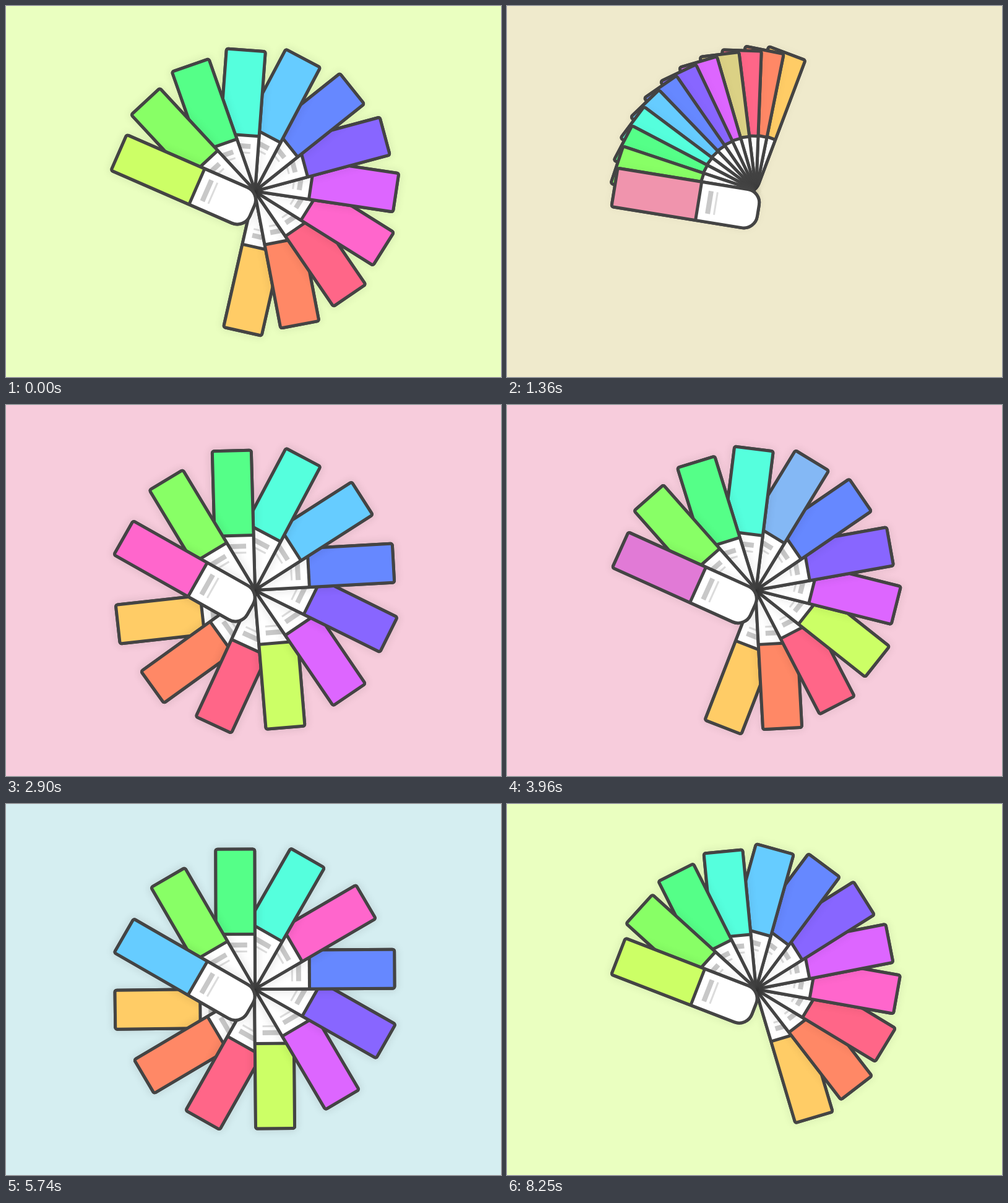
Write an HTML page with a canvas that moves like this. It is 800x600 px and loops after 8280 ms.

```html
<!DOCTYPE html>
<html lang="en">
<head>
<meta charset="utf-8">
<title>Colour swatch fan</title>
<style>
  html, body { margin: 0; width: 100%; height: 100%; overflow: hidden; }
  canvas { display: block; }
</style>
</head>
<body>
<canvas id="stage" width="800" height="600"></canvas>
<script>
const ctx = document.getElementById('stage').getContext('2d');
const LOOP = 8280, FIRST_TAP = 940;
const MOVE = 700, DELAY = 16;
const PIVOT = [402, 299], OPEN = 30, CLOSED = 0.34;
const INK = '#444';

const hex = s => [1, 3, 5].map(i => parseInt(s.slice(i, i + 2), 16));
const SWATCHES = ['#ccff66', '#88ff66', '#55ff88', '#55ffdd', '#66ccff', '#6688ff',
  '#8866ff', '#dd66ff', '#ff66cc', '#ff6688', '#ff8866', '#ffcc66'].map(hex);
const [LIME, PINK, BLUE, MINT] = ['#eaffc0', '#f7ccdc', '#d5eef1', '#dcffee'].map(hex);

// Each round: a tap picks a card and closes the fan, a second tap opens it.
const ROUNDS = [
  { close: 0, open: 1360, pick: 8, at: [427, 465], back: [LIME, PINK] },
  { close: 2750, open: 4140, pick: 4, at: [532, 195], back: [PINK, BLUE] },
  { close: 5530, open: 6890, pick: 8, at: [427, 465], back: [BLUE, MINT, LIME] },
];
const TOP_TAP = [247, 326];

const clamp = x => Math.min(1, Math.max(0, x));
const ease = x => x < 0.5 ? 4 * x ** 3 : 1 - 4 * (1 - x) ** 3;
const mix = (a, b, p) => a.map((v, i) => v + (b[i] - v) * p);
const css = c => `rgb(${c.map(Math.round)})`;

function mixPath(stops, p) {
  const x = p * (stops.length - 1);
  const i = Math.min(Math.floor(x), stops.length - 2);
  return mix(stops[i], stops[i + 1], x - i);
}

function swap(colors, pick, p) {
  const top = colors[0], other = colors[pick];
  colors[0] = mix(top, other, p);
  colors[pick] = mix(other, top, p);
}

function box(color, ...rect) {
  ctx.fillStyle = color;
  ctx.fillRect(...rect);
}

function drawCard(angle, color, shade) {
  ctx.save();
  ctx.translate(...PIVOT);
  ctx.rotate(angle * Math.PI / 180);
  const outline = new Path2D();
  outline.roundRect(-226, -0.5, 235, 63, [3, 22, 22, 3]);
  ctx.strokeStyle = INK;
  ctx.lineWidth = 5;
  ctx.shadowColor = `rgba(0,0,0,${0.2 * shade})`;
  ctx.shadowBlur = 14;
  ctx.stroke(outline);
  ctx.shadowColor = 'transparent';
  ctx.fillStyle = '#fff';
  ctx.fill(outline);
  box(css(color), -225, 0, 137, 62);
  box(INK, -91, 0, 5, 62);
  box('#c8c8c8', -75, 12, 8, 37);
  box('#dcdcdc', -62, 12, 3, 37);
  ctx.stroke(outline);
  ctx.restore();
}

function drawTap([x, y], age) {
  const p = age / 160;
  if (p >= 1) return;
  ctx.save();
  ctx.globalAlpha = 1 - p;
  ctx.fillStyle = 'rgba(255,255,255,.68)';
  ctx.beginPath();
  ctx.arc(x, y, 42 + 4 * p, 0, 7);
  ctx.closePath();
  ctx.moveTo(x + 14 + 30 * p, y);
  ctx.arc(x, y, 14 + 30 * p, 0, 7);
  ctx.fill('evenodd');
  ctx.strokeStyle = 'rgba(90,20,70,.6)';
  ctx.lineWidth = 1;
  ctx.beginPath();
  ctx.arc(x, y, 3, 0, 7);
  ctx.stroke();
  ctx.restore();
}

function draw(time) {
  const t = (time - FIRST_TAP + LOOP) % LOOP;
  const current = ROUNDS.findLastIndex(r => t >= r.close);
  const round = ROUNDS[current];
  const opening = t >= round.open;
  const age = t - (opening ? round.open : round.close);
  const p = ease(clamp((age - DELAY) / MOVE));
  const spread = opening ? p : 1 - p;

  // The colour order resets unseen before the last opening.
  const colors = [...SWATCHES];
  if (!(opening && current === ROUNDS.length - 1)) {
    ROUNDS.slice(0, current).forEach(r => swap(colors, r.pick, 1));
    swap(colors, round.pick, opening ? 1 : p);
  }

  const backMix = opening ? 1 : clamp((age - 280) / 340);
  box(css(mixPath(round.back, backMix)), 0, 0, 800, 600);
  const step = CLOSED + (OPEN - CLOSED) * spread;
  for (let i = colors.length; i > 0; i--) drawCard(i * step, colors[i - 1], spread);
  drawTap(opening ? TOP_TAP : round.at, age);
}

const start = performance.now();
function tick() {
  draw((performance.now() - start) % LOOP);
  requestAnimationFrame(tick);
}
tick();
</script>
</body>
</html>
```
